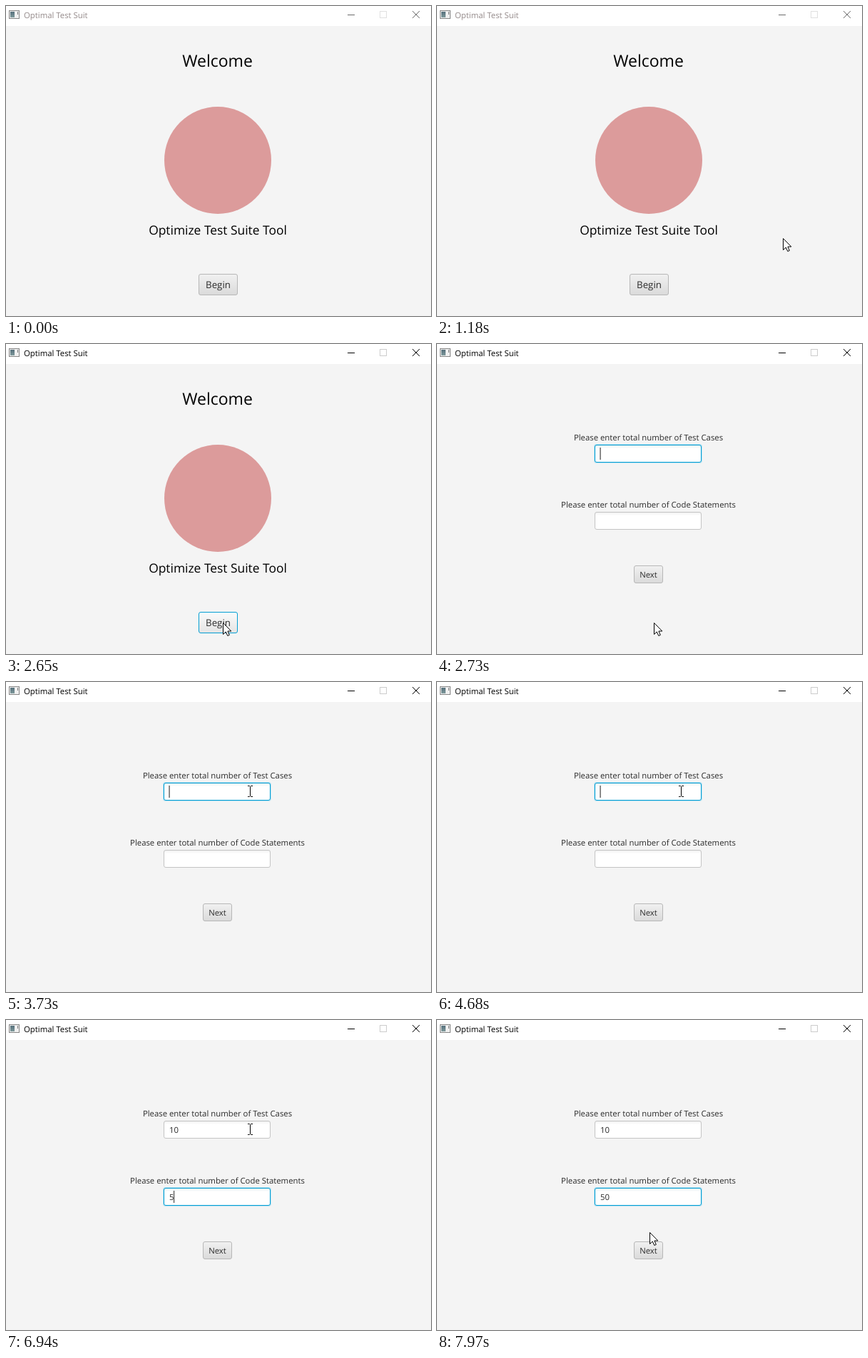
Animation of 596x434 px, one loop 8 s. Source, as an HTML page:

```html
<!DOCTYPE html>
<html lang="en">
<head>
<meta charset="utf-8">
<title>Optimal Test Suit</title>
<style>
  html, body { margin: 0; width: 100%; height: 100%; overflow: hidden; background: #f4f4f4; }
  svg { display: block; width: 596px; height: 434px; }
  text { font: 11.35px "Open Sans", "Noto Sans", sans-serif; fill: #2b2b2b; text-rendering: geometricPrecision; }
  .mid { text-anchor: middle; }
  #welcome .head { font-size: 23px; fill: #000; }
  #welcome .sub { font-size: 17.4px; fill: #000; }
  #begin text { font-size: 13.3px; }
  .button rect { fill: url(#face); stroke: #b7b7b7; }
  .button.hover rect { fill: url(#faceHover); }
  .button.focus rect { stroke: #039ed3; }
  .field .edge { fill: url(#well); stroke: #c4c4c4; }
  .field .glow { fill: none; stroke: #b5e1f1; stroke-width: 3; visibility: hidden; }
  .field.focus .edge { stroke: #039ed3; }
  .field.focus .glow { visibility: visible; }
  .caret { fill: #666; }
  #bar { --ink: #6b6b6b; --title: #948a8a; --max: #e0e0e0; }
  #bar.active { --ink: #000; --title: #000; --max: #ccc; }
  #bar text { fill: var(--title); }
  #bar .controls { fill: none; stroke: var(--ink); }
  #bar .max { stroke: var(--max); }
</style>
</head>
<body>
<svg viewBox="0 0 596 434">
  <defs>
    <linearGradient id="face" x2="0" y2="1">
      <stop stop-color="#f1f1f1"/><stop offset="1" stop-color="#dadada"/>
    </linearGradient>
    <linearGradient id="faceHover" x2="0" y2="1">
      <stop stop-color="#fbfbfb"/><stop offset="1" stop-color="#e4e4e4"/>
    </linearGradient>
    <linearGradient id="well" x2="0" y2="1">
      <stop stop-color="#f0f0f0"/><stop offset=".2" stop-color="#fff"/>
    </linearGradient>
    <linearGradient id="pane" x2="0" y2="1">
      <stop stop-color="#56707c"/><stop offset="1" stop-color="#7f9a9c"/>
    </linearGradient>
  </defs>

  <rect width="596" height="434" fill="#f4f4f4"/>
  <g id="bar">
    <rect width="596" height="28" fill="#fff"/>
    <rect x="4.5" y="6.5" width="14" height="11" fill="#f0f0f0" stroke="#858585"/>
    <rect x="6" y="8" width="6" height="8" fill="url(#pane)"/>
    <path d="M16.5 8v4" stroke="#777"/>
    <text x="25" y="17">Optimal Test Suit</text>
    <g class="controls">
      <path d="M479 12.5h10M570 7l10 10M580 7l-10 10"/>
      <rect class="max" x="524.5" y="7.5" width="9" height="9"/>
    </g>
  </g>

  <g id="welcome">
    <text class="mid head" x="296.5" y="85">Welcome</text>
    <circle cx="297" cy="216" r="75" fill="#dc9b9b"/>
    <text class="mid sub" x="297" y="320">Optimize Test Suite Tool</text>
    <g id="begin" class="button">
      <rect x="270.5" y="375.5" width="54" height="29" rx="2.5"/>
      <text class="mid" x="297.5" y="395">Begin</text>
    </g>
  </g>

  <g id="form">
    <text class="mid" x="296.5" y="135">Please enter total number of Test Cases</text>
    <g id="cases" class="field" transform="translate(221 141)"></g>
    <text class="mid" x="296.5" y="229">Please enter total number of Code Statements</text>
    <g id="statements" class="field" transform="translate(221 235)"></g>
    <g class="button">
      <rect x="276.5" y="310.5" width="40" height="24" rx="2.5"/>
      <text class="mid" x="296.5" y="327">Next</text>
    </g>
  </g>

  <path id="arrow" d="M.5.5V16.5L4.3 13 6.8 18.5 9.3 17.4 6.9 12H11.8Z" fill="#fff" stroke="#000"/>
  <path id="beam" d="M-3.5-7.5h2.5l1 1 1-1h2.5M0-6.5V6.5M-3.5 7.5h2.5l1-1 1 1h2.5" fill="none" stroke="#000"/>
</svg>
<script>
const LOOP = 8000, ACTIVATE = 2570, SHOW_FORM = 2730, SWITCH_FIELD = 5990;
const $ = id => document.getElementById(id);
const show = (el, on) => { el.style.display = on ? "" : "none"; };

for (const id of ["cases", "statements"]) {
  $(id).innerHTML = `
    <rect class="glow" x=".5" y=".5" width="149" height="24" rx="2.5"/>
    <rect class="edge" x=".5" y=".5" width="149" height="24" rx="2.5"/>
    <text x="8" y="17"></text>
    <rect class="caret" y="4" width="1.5" height="17"/>`;
}

// Pointer moves: each is sampled in a fixed number of steps along a quadratic curve.
const moves = [
  { start: 300, end: 710, steps: 6, from: [506, 425], via: [500, 370], to: [487, 325] },
  { start: 1180, end: 1870, steps: 10, from: [485, 325], via: [385, 350], to: [304, 390] },
  { start: 3110, end: 3730, steps: 9, from: [306, 386], via: [460, 250], to: [342, 153] },
  { start: 7730, end: 7970, steps: 4, from: [341, 160], via: [322, 225], to: [298, 297] }
];

// Typed text and caret changes: [time, text, caret visible].
const casesLog = [
  [SHOW_FORM, "", true], [3230, "", false], [3730, "", true], [4210, "", false],
  [4680, "", true], [5230, "", false], [5460, "1", true], [5610, "10", true],
  [SWITCH_FIELD, "10", false]
];
const statementsLog = [
  [0, "", false], [SWITCH_FIELD, "", true], [6470, "", false],
  [6940, "5", true], [7090, "50", true], [7560, "50", false]
];

const clamp = x => Math.min(1, Math.max(0, x));
const inside = ([x, y], left, top, right, bottom) =>
  x >= left && x <= right && y >= top && y <= bottom;

function pointerAt(t) {
  const move = moves.findLast(m => t >= m.start);
  if (!move) return null;
  const { start, end, steps, from, via, to } = move;
  const part = clamp((t - start) / (end - start));
  const p = Math.floor(part * (steps - 1) + 1e-6) / (steps - 1);
  const u = p * p * (3 - 2 * p), v = 1 - u;
  return from.map((a, i) => Math.round(v * v * a + 2 * u * v * via[i] + u * u * to[i]));
}

function drawField(id, log, t, focused) {
  const field = $(id);
  const [, text, caretOn] = log.findLast(entry => t >= entry[0]) || log[0];
  const caret = field.querySelector(".caret");
  field.classList.toggle("focus", focused);
  field.querySelector("text").textContent = text;
  caret.setAttribute("x", 7.3 + text.length * 6.5);
  show(caret, focused && caretOn);
}

function drawPointer(pos, onForm) {
  const overField = onForm && pos &&
    (inside(pos, 221, 141, 371, 166) || inside(pos, 221, 235, 371, 260));
  show($("arrow"), pos && !overField);
  show($("beam"), overField);
  if (!pos) return;
  const [x, y] = pos;
  $("arrow").setAttribute("transform", `translate(${x} ${y})`);
  $("beam").setAttribute("transform", `translate(${x + .5} ${y})`);
}

function draw(t) {
  const onForm = t >= SHOW_FORM, pos = pointerAt(t);
  show($("welcome"), !onForm);
  show($("form"), onForm);
  $("bar").classList.toggle("active", t >= ACTIVATE);
  $("begin").classList.toggle("focus", t >= ACTIVATE);
  $("begin").classList.toggle("hover", !!pos && inside(pos, 270, 375, 325, 405));
  drawField("cases", casesLog, t, t < SWITCH_FIELD);
  drawField("statements", statementsLog, t, t >= SWITCH_FIELD);
  drawPointer(pos, onForm);
}

const began = performance.now();
function tick() {
  draw((performance.now() - began) % LOOP);
  requestAnimationFrame(tick);
}
tick();
</script>
</body>
</html>
```
